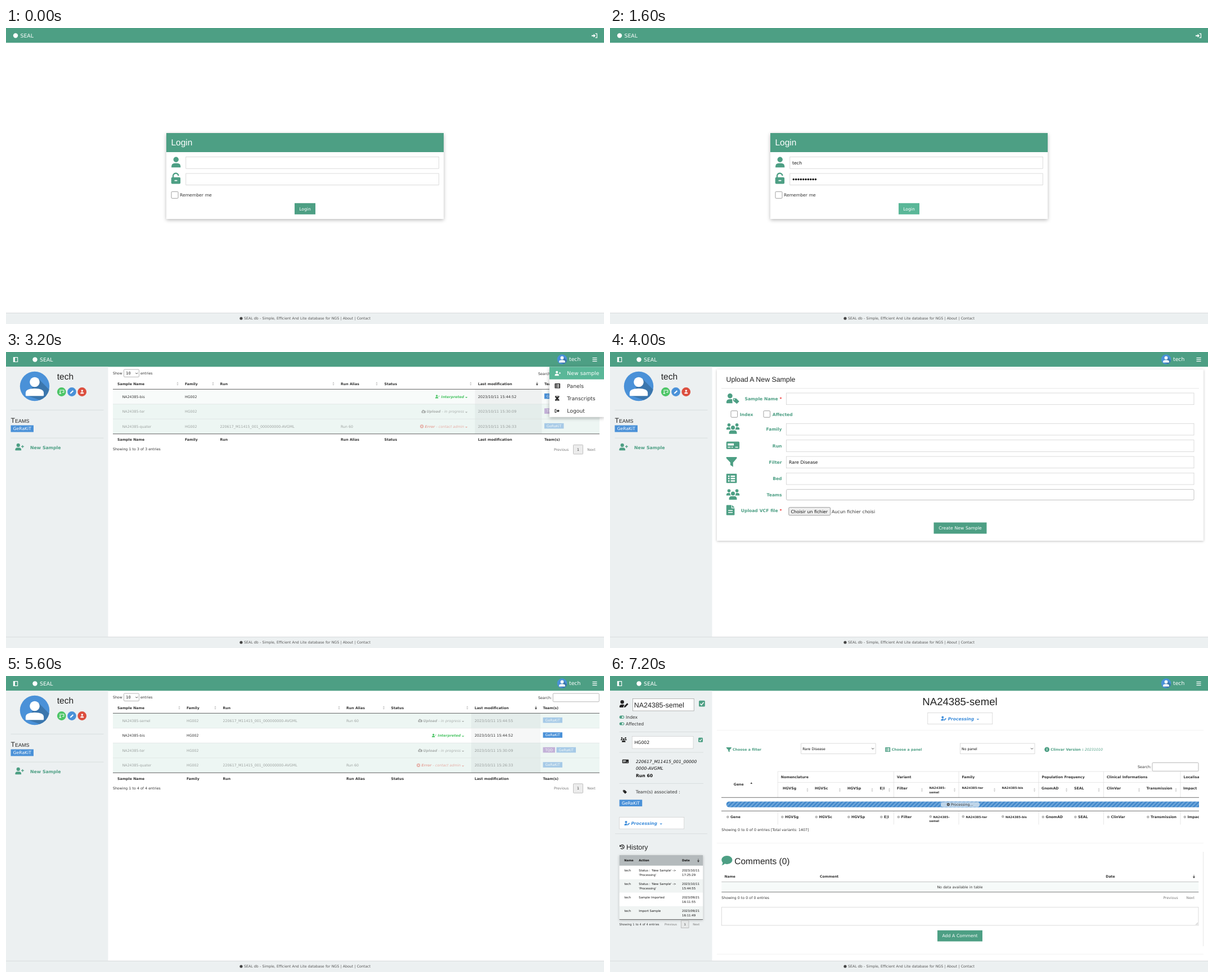
An HTML page that plays this animation: 1063x527 px, repeating every 8000 ms.

```html
<!DOCTYPE html>
<html lang="en">
<head>
<meta charset="utf-8">
<title>SEAL db</title>
<style>
html, body { margin: 0; width: 100%; height: 100%; overflow: hidden; background: #fff; }
svg { display: block; width: 100%; height: 100%; }
text { font-family: "DejaVu Sans", sans-serif; fill: #333; word-spacing: .034em; text-rendering: geometricPrecision; white-space: pre; }
.ar { font-family: "Liberation Sans", Arial, sans-serif; word-spacing: 0; fill: #222; }
.b { font-weight: bold; }
.i { font-style: italic; }
.m { text-anchor: middle; }
.e { text-anchor: end; }
.w { fill: #fff; }
.k { fill: #111; }
.g { fill: #4d9f84; }
.bl { fill: #3f8edb; }
.gy { fill: #777; }
.caps { font-variant: small-caps; }
.card { filter: drop-shadow(0 2px 3px rgba(0,0,0,.28)); }
.soft { filter: drop-shadow(0 1px 2px rgba(0,0,0,.25)); }
</style>
</head>
<body>
<svg id="stage" viewBox="0 0 1063 527" preserveAspectRatio="none"></svg>
<script>
const GREEN = '#4d9f84', HOVER = '#5ab798', BLUE = '#4a91d8', SIDE = '#ecf0f1', RED = '#dc4f3f', LIME = '#4cc566', PURPLE = '#8e57b5';
const NAME = 'tech', TEAM = 'GeRaKiT', TEAM2 = 'TQD', RUN = '220617_M11415_001_000000000-AVGML';

const T = (x, y, s, c = '', z = 6.2, more = '') => `<text x="${x}" y="${y}" class="${c}" font-size="${z}" ${more}>${s}</text>`;
const R = (x, y, w, h, fill = '#fff', more = '') => `<rect x="${x}" y="${y}" width="${w}" height="${h}" fill="${fill}" ${more}/>`;
const C = (x, y, r, fill, more = '') => `<circle cx="${x}" cy="${y}" r="${r}" fill="${fill}" ${more}/>`;
const P = (d, fill, more = '') => `<path d="${d}" fill="${fill}" ${more}/>`;
const L = (x, y, x2, y2, color = '#ddd', w = .7) => `<path d="M${x} ${y}L${x2} ${y2}" stroke="${color}" stroke-width="${w}"/>`;
const box = (x, y, w, h, color = '#ccc', r = 0) => R(x, y, w, h, '#fff', `stroke="${color}" stroke-width=".7" rx="${r}"`);
const button = (x, y, w, h, s, fill = GREEN) => R(x, y, w, h, fill) + T(x + w / 2, y + h / 2 + 2.8, s, 'w m', 7.7);
const chip = (x, y, w, h, s, z = 6.2, fill = BLUE) => R(x, y, w, h, fill) + T(x + w / 2, y + h / 2 + z * .36, s, 'w m', z);

// Icons live on a grid 16 units high.
const person = 'M7 0a4 4 0 1 1 0 8a4 4 0 1 1 0-8M0 15Q0 9.5 5.5 9.5h3Q14 9.5 14 15q0 1-1 1H1q-1 0-1-1z';
const icons = {
  person,
  plus: person + 'M16 4h1.7v2.3H20V8h-2.3v2.3H16V8h-2.3V6.300H16z',
  check: person + 'M13 6l1.2-1.200L16 6.600 19 3.500 20.200 4.800 16 9z',
  edit: 'M6 0a4 4 0 1 1 0 8a4 4 0 1 1 0-8M0 15Q0 9.500 5.500 9.500h2Q10 9.500 11 10.500L9 13 8.500 16H1q-1 0-1-1zM10 16l.6-3L17 6.500l2.300 2.300L13 15.400z',
  tagged: 'M6 0a4 4 0 1 1 0 8a4 4 0 1 1 0-8M0 15Q0 9.500 5.500 9.500h4L10 16H1q-1 0-1-1zM11 8h5l5 5-4 4-6-5zM13 9.300a.9.9 0 1 0 0 1.800a.9.9 0 1 0 0-1.800z',
  group: 'M10 3.500a3 3 0 1 1 0 6a3 3 0 1 1 0-6M4 0a2.400 2.400 0 1 1 0 4.800a2.400 2.400 0 1 1 0-4.800M16 0a2.400 2.400 0 1 1 0 4.800a2.400 2.400 0 1 1 0-4.800M4 15Q4 10.600 8 10.600h4Q16 10.600 16 15q0 1-1 1H5q-1 0-1-1zM0 9q0-3.200 3-3.200h2.300Q6 9 7 9.600H1Q0 9.600 0 9zM20 9q0-3.200-3-3.200h-2.300Q14 9 13 9.600h6q1 0 1-.6z',
  filter: 'M0 0H17V2L11 9V16L6.500 13V9L0 2z',
  list: 'M1 0H17q1 0 1 1V15q0 1-1 1H1q-1 0-1-1V1q0-1 1-1M3 3v2.500h2.500V3zM7.500 3v2.500H15V3zM3 7v2.500h2.500V7zM7.500 7v2.500H15V7zM3 11v2.500h2.500V11zM7.500 11v2.500H15V11z',
  file: 'M1 0H8V5H13V15q0 1-1 1H1q-1 0-1-1V1q0-1 1-1M9 0L13 4H9zM3 8v1.300h7V8zM3 11v1.300h7V11z',
  machine: 'M2 0H26q2 0 2 2V14q0 2-2 2H2q-2 0-2-2V2q0-2 2-2M3 4v4.500H16V4zM3 11v2H9v-2zM11 11v2h3v-2zM19 11v2h6v-2z',
  tag: 'M0 1H7L15 9 8.500 15.500 0 7zM3 3a1.300 1.300 0 1 0 0 2.600a1.300 1.300 0 1 0 0-2.600z',
  cloud: 'M5 15a5 5 0 0 1-1-9.500a5.500 5.500 0 0 1 10.500-1.500a5 5 0 0 1 2 11zM10 5L6 9.500h2.500V13h3V9.500H14z',
  error: 'M8 0a8 8 0 1 1 0 16a8 8 0 1 1 0-16M5 3.500L3.500 5l3 3-3 3L5 12.500l3-3 3 3 1.500-1.500-3-3 3-3L11 3.500l-3 3z',
  exit: 'M0 2H6V4H2V12H6V14H0zM5 6.500H10V3L16 8 10 13V9.500H5z',
  enter: 'M0 6.500H6V2.500L12 8 6 13.500V9.500H0zM11 1H17V15H11V13H15V3H11z',
  gene: 'M1 0H15V3Q14 6 10 8 14 10 15 13V16H1V13Q2 10 6 8 2 6 1 3zM4 2v1h8V2zM4 13v1h8v-1z',
  pane: 'M1 0H14q1 0 1 1V15q0 1-1 1H1q-1 0-1-1V1q0-1 1-1M5.500 2V14H13V2z',
  gear: 'M6.500 0h3l.5 2 2 1 2-.6 1.500 2.600-1.500 1.500v3l1.500 1.500-1.500 2.600-2-.6-2 1-.5 2h-3L6 14l-2-1-2 .6L.5 11 2 9.500v-3L.5 5 2 2.400 4 3l2-1zM8 5a3 3 0 1 0 0 6a3 3 0 1 0 0-6z',
  pen: 'M0 16L1.500 11 11 1.500 14.500 5 5 14.500z',
  board: 'M2 1H18V11H11V9H16V3H4V5H2zM4 6a2 2 0 1 1 0 4a2 2 0 1 1 0-4M0 15Q0 11 4 11T8 15z',
  history: 'M8 1a7 7 0 1 1-5.500 11.500L4 11a5 5 0 1 0-.3-5.600L6 7.500H0V1.500L2.200 3.800A7 7 0 0 1 8 1M7 4.500H9V8l2.500 1.800-1 1.500L7 9z',
  bubble: 'M9 0C14 0 18 3 18 7S14 14 9 14Q7 14 5.500 13.500 3 16 0 16 2 14 2 11.500 0 9.500 0 7C0 3 4 0 9 0z'
};
const icon = (name, x, y, h, fill = GREEN) => `<path d="${icons[name]}" fill="${fill}" fill-rule="evenodd" transform="translate(${x} ${y}) scale(${h / 16})"/>`;
const caret = (x, y, fill) => P(`M${x} ${y}h4.400l-2.200 2.200z`, fill);
const chevron = (x, y) => P(`M${x} ${y}l2 2 2-2`, 'none', 'stroke="#333" stroke-width=".9"');
const sorter = (x, y, on) => on ? P(`M${x - 2} ${y}h4l-2 3.500zM${x - .4} ${y - 3}h.8v3h-.8z`, '#444') : P(`M${x - 1.600} ${y - .6}l1.600-3 1.600 3zM${x - 1.600} ${y + .6}l1.600 3 1.600-3z`, '#ccc');
const tick = (x, y, s, fill) => R(x, y, s, s, fill, 'rx="1.5"') + P(`M${x + s * .22} ${y + s * .52}l${s * .2} ${s * .22} ${s * .37}-${s * .46}`, 'none', `stroke="#fff" stroke-width="${s * .13}"`);
const avatar = (x, y, r) => `<g transform="translate(${x} ${y}) scale(${r / 26})">` + C(0, 0, 26, BLUE) +
  P('M7-13L25.500 6A26 26 0 0 1 9 24.400L-15 16z', '#3b76ad') + C(0, -7.500, 8.700, '#fff') +
  P('M-16 16V12Q-16 4 0 4T16 12V16q0 1-1 1H-15q-1 0-1-1z', '#fff') + '</g>';

const bars = () => R(0, 0, 1063, 26.300, GREEN) + R(0, 507, 1063, 20, SIDE) + L(0, 507.400, 1063, 507.400, '#d3d7d8', .8) +
  C(418, 517, 2.600, '#444') + T(423, 519.300, 'SEAL db - Simple, Efficient And Lite database for NGS | About | Contact', '', 6.250, 'style="fill:#555"');
const brand = x => C(x, 13.500, 4.200, '#fff') + T(x + 8.500, 16.900, 'SEAL', 'w', 9.350);
const frame = () => bars() + brand(51.500) + icon('pane', 12.800, 9, 9, '#fff') + avatar(988.500, 13, 8.700) + T(1001, 16.200, NAME, 'w', 9.300) +
  [10.500, 13.500, 16.500].map(y => L(1042.500, y, 1050.500, y, '#fff', 1.200)).join('') + R(0, 26.300, 181.500, 480.700, SIDE);

const login = (filled, focus, hover) => bars() + brand(17) + icon('enter', 1041, 9, 9.500, '#fff') +
  R(285, 187, 493, 153, '#fff', 'class="card"') + R(285, 187, 493, 34, GREEN) + T(293.500, 209, 'Login', 'ar', 15.500, 'style="fill:#fff"') +
  icon('person', 294, 229.500, 18.800) + P('M297 267V264.500a4.800 5 0 0 1 9.600-1.500', 'none', `stroke="${GREEN}" stroke-width="2.300"`) +
  R(293.700, 265.800, 16.400, 11.800, GREEN, 'rx="2"') + R(299.500, 270.700, 5, 1.900, '#fff', 'rx=".9"') +
  box(319.800, 229.500, 449.500, 20.700) + box(319.800, 259, 449.500, 20.500, focus ? '#555' : '#ccc') +
  (filled ? T(324, 242.700, NAME, 'k', 7.800) + Array.from({ length: 10 }, (_, i) => C(326.300 + i * 4.350, 269.500, 1.700, '#111')).join('') : '') +
  box(294, 291.300, 12, 12, '#767676', 1.500) + T(309, 300.200, 'Remember me', '', 7.650) + button(513, 311.800, 37, 20, 'Login', hover ? HOVER : GREEN);

const sidebar = d => `<g transform="translate(0 ${d})">` + avatar(51, 61, 26.200) + T(90.800, 48.800, NAME, 'ar', 15.500) +
  C(98.800, 71, 7.900, LIME) + C(117, 71, 7.900, BLUE) + C(135.200, 71, 7.900, RED) +
  icon('board', 94.400, 67, 8, '#fff') + icon('pen', 113.800, 67.500, 7, '#fff') + icon('person', 132.200, 67.300, 7, '#fff') +
  L(8.500, 103.400, 173.500, 103.400, '#d2d6d7') + T(8.500, 125.500, 'Teams', 'ar caps', 12.300) + chip(8.500, 130.500, 40.500, 12, TEAM, 7.600) +
  L(8.500, 153.200, 173.500, 153.200, '#d2d6d7') + icon('plus', 16.300, 162.800, 12.500) + T(43, 173.200, 'New Sample', 'b g', 7.800) + '</g>';
const alert = () => R(8.300, 35, 165, 20.500, '#ddfadb') + R(8.300, 35, 3, 20.500, '#4caf50') +
  T(19.500, 47.800, `You are logged in as: ${NAME}!`, 'k', 7.700) + T(159, 47.800, '×', 'b k', 7.700);

const wide = { x: [198, 321, 385.500, 605, 684.500, 833, 954.500], s: [308, 372, 592, 671.500, 820, 942], from: 827, to: 950, end: 814.500 };
const tight = { x: [198, 318, 380.500, 595, 672.500, 839, 957], s: [305, 368, 582, 659, 826, 944], from: 833.500, to: 952.500, end: 820.500 };
const heads = ['Sample Name', 'Family', 'Run', 'Run Alias', 'Status', 'Last modification', 'Team(s)'];
const states = {
  fresh: ['plus', 59.500, '#3f8edb', 'New Sample', ''],
  done: ['check', 57.500, LIME, 'Interpreted', ''],
  work: ['edit', 54.500, '#3f8edb', 'Processing', ''],
  load: ['cloud', 82.500, '#555', 'Upload', ' - in progress'],
  fail: ['error', 84.500, RED, 'Error', ' - contact admin']
};
const sample = (id, state, time, run, teams = [TEAM]) => ({ id, state, time, run, teams, dim: state == 'load' || state == 'fail' });
const semel = s => sample('semel', s, '15:44:55', 1), bis = sample('bis', 'done', '15:44:52'),
  ter = s => sample('ter', s, '15:30:09', 0, [TEAM2, TEAM]), quater = sample('quater', 'fail', '15:26:33', 1);

function row(r, i, c) {
  const y = 66.300 + i * 26.500, b = y + 15.400, [ic, dx, color, main, rest] = states[r.state], end = c.end;
  let tx = c.x[6];
  const left = end - (r.state == 'work' ? 54.500 : dx);
  return R(190, y, 865, 26.500, r.dim ? '#edf6f3' : i % 2 ? '#fff' : '#f8fbfa') + R(c.from, y, c.to - c.from, 26.500, r.dim ? '#e4edeb' : i % 2 ? '#f6f7f7' : '#eff1f1') +
    (i ? L(190, y, 1055, y, '#d5dcda', .6) : '') + `<g opacity="${r.dim ? .43 : 1}">` +
    T(c.x[0] + 8.700, b, 'NA24385-' + r.id, '', 6.250) + T(c.x[1], b, 'HG002', '', 6.250) +
    (r.run ? T(c.x[2], b, RUN, '', 6.350) + T(c.x[3], b, 'Run 60') : '') +
    icon(ic, left, y + 10, 6.300, color) +
    T(end - 6.300, b, `<tspan class="b">${main}</tspan>${rest}`, 'i e', 6.250, `style="fill:${color}"`) + caret(end - 4.400, y + 13.600, color) +
    T(c.x[5], b, '2023/10/11 ' + r.time, '', 6.450) +
    r.teams.map(t => { const w = t == TEAM ? 34.500 : 21.500, x = tx; tx += w + 2.500; return chip(x, y + 7.500, w, 9.600, t, 6.250, t == TEAM ? BLUE : PURPLE); }).join('') + '</g>';
}
function table(rows, c = wide) {
  const n = rows.length, end = 66.300 + n * 26.500;
  return T(190, 40, 'Show') + box(209.500, 31, 27, 13.500, '#999', 1.500) + T(213.300, 40.300, '10', 'k', 6.700) + chevron(230.300, 37) + T(239, 40, 'entries') +
    T(946, 40.800, 'Search:', '', 6.400) + box(972.300, 31, 82, 14.800, '#999', 1.500) +
    heads.map((h, i) => T(c.x[i], 58.500, h, 'b') + T(c.x[i], end + 12.500, h, 'b')).join('') +
    c.s.map((x, i) => sorter(x, 56.500, i == 5)).join('') + rows.map((r, i) => row(r, i, c)).join('') +
    L(190, 66.300, 1055, 66.300, '#222', .7) + L(190, end, 1055, end, '#222', .7) +
    T(190, end + 29.500, `Showing 1 to ${n} of ${n} entries`) + T(974, end + 30, 'Previous', 'gy') +
    R(1008.500, end + 19.500, 17, 16.500, '#ececec', 'stroke="#aaa" stroke-width=".7" rx="1"') + T(1017, end + 30, '1', 'm') + T(1033.300, end + 30, 'Next', 'gy');
}
const menu = () => R(966, 26.300, 97, 89.500, '#fff', 'class="card"') + R(966, 26.300, 97, 22.400, HOVER) +
  ['plus New sample', 'list Panels', 'gene Transcripts', 'exit Logout'].map((s, i) => {
    const k = s.indexOf(' '), y = 41.200 + i * 22.300;
    return icon(s.slice(0, k), 975.500, y - 7.500, 8.500, i ? '#222' : '#fff') + T(997.300, y, s.slice(k + 1), i ? '' : 'w', 9.250);
  }).join('');

function form(full) {
  const label = (y, s, must) => T(305.500, y, s + (must ? ' <tspan fill="#e33">*</tspan>' : ''), 'b g e', 7.600);
  const field = (y, label_, name, h, ix, value, must) => icon(name, 206.800, y + ix, h) + label(y + 12.900, label_, must) + box(313.500, y, 724.500, 20.700) + T(318, y + 13.400, value, 'k', 7.800);
  const check = (x, s) => (full ? tick(x, 104.500, 12, '#2f73e6') : box(x, 104.700, 11.600, 11.600, '#767676', 1.500)) + T(x + 15.800, 113.700, s, 'b g', 7.600);
  const v = s => full ? s : '';
  return R(190, 31, 865, 305, '#fff', 'class="soft"') + T(206.500, 53.300, 'Upload A New Sample', 'ar', 12.350) + L(198, 64.800, 1047, 64.800) +
    field(73, 'Sample Name', 'tagged', 17.500, .7, v('NA24385-semel'), 1) + check(215, 'Index') + check(273, 'Affected') +
    field(127.300, 'Family', 'group', 18.800, -.3, v('HG002')) + field(156.700, 'Run', 'machine', 13.300, 2.800, v(RUN)) +
    field(186, 'Filter', 'filter', 17.500, 1, 'Rare Disease') + field(215.300, 'Bed', 'list', 16.500, 1.500, '') +
    icon('group', 206.800, 244.300, 18.800) + label(257.300, 'Teams') + box(313.500, 244.700, 724.500, 18.800, '#aaa', 2) +
    (full ? R(317, 248, 47, 12.300, '#e4e4e4', 'stroke="#aaa" stroke-width=".7" rx="2"') + T(319.300, 257, '×', '', 7) + T(328.300, 257, TEAM, '', 7.700) : '') +
    icon('file', 206.800, 272.600, 18) + label(284.700, 'Upload VCF file', 1) +
    R(317.800, 276.700, 73.800, 14, '#efefef', 'stroke="#767676" stroke-width=".7" rx="1.500"') + T(321.500, 286.500, 'Choisir un fichier', 'k', 7.700) +
    T(394, 286.500, full ? 'SEAL - NA24385-semel.vcf' : 'Aucun fichier choisi', '', 7.850) + button(575.500, 303.500, 94, 20, 'Create New Sample');
}

function sideDetail() {
  const line = y => L(16.500, y, 166, y, '#d2d6d7');
  const toggle = y => R(16.700, y - 2.600, 8.600, 5.200, GREEN, 'rx="2.600"') + C(22.600, y, 1.500, '#fff');
  const logs = [["Status : 'New Sample' -&gt;", "'Processing'", '2023/10/11', '17:25:29'], ["Status : 'New Sample' -&gt;", "'Processing'", '2023/10/11', '15:44:55'],
    ['Sample Imported', '', '2023/09/21', '16:11:55'], ['Import Sample', '', '2023/09/21', '16:11:49']];
  return icon('edit', 16.800, 43, 13, '#222') + box(40.500, 40.300, 108.700, 21.700, '#999') + T(42.800, 55.600, 'NA24385-semel', 'ar', 12.400) + tick(158, 43.700, 10.800, GREEN) +
    toggle(73.200) + T(28, 76, 'Index', '', 7.700) + toggle(85) + T(28, 87.800, 'Affected', '', 7.700) + line(99.500) +
    icon('group', 18.800, 109, 8.800, '#222') + box(39.300, 107.500, 108.700, 21.500) + T(43.500, 121, 'HG002', 'k', 7.800) + tick(157, 109.700, 8, GREEN) + line(136) +
    icon('machine', 21.800, 148.800, 6.500, '#222') + T(46, 155, RUN.slice(0, 23), 'i k', 7.500) + T(46, 167.300, RUN.slice(23), 'i k', 7.600) + T(46, 179.700, 'Run 60', 'b k', 7.600) + line(191.400) +
    icon('tag', 23, 202.500, 7.500, '#222') + T(45.800, 208.900, 'Team(s) associated :', '', 7.650) + chip(16.700, 220.300, 40.500, 11.800, TEAM, 7.600) +
    box(16.700, 251.600, 115, 20.500) + icon('edit', 25.500, 258, 8, '#3f8edb') + T(37.500, 264.700, 'Processing', 'b i bl', 7.600) + caret(88.500, 262.500, '#3f8edb') +
    L(9, 280.800, 173, 280.800, '#d2d6d7') + icon('history', 17, 299.500, 9.500, '#222') + T(29, 308.500, 'History', 'ar', 12.400) +
    R(16.700, 319, 148.500, 114.500, '#fff', 'class="soft"') + R(16.700, 319, 148.500, 18.800, '#b4babc') +
    T(25.300, 330.300, 'Name', 'b k', 5.100) + T(51.200, 330.300, 'Action', 'b k', 5.200) + T(128, 330.300, 'Date', 'b k', 5.200) + sorter(157, 328.500, 1) +
    logs.map((g, i) => {
      const y = 348 + i * 24;
      return R(16.700, y - 10.200, 148.500, 24, i % 2 ? '#f0f4f3' : '#fff') + T(25.500, y, NAME, 'k', 5.250) + T(51.300, y, g[0], 'k', 5.250) + T(51.300, y + 7.500, g[1], 'k', 5.250) +
        T(128, y, g[2], 'k', 5.400) + T(128, y + 7.500, g[3], 'k', 5.400);
    }).join('') + L(16.700, 433.500, 165.200, 433.500, '#333') +
    T(16.500, 444, 'Showing 1 to 4 of 4 entries', '', 5.200) + T(97, 444, 'Previous', 'gy', 5.200) +
    R(126.300, 435.700, 13.700, 12.700, '#e6e8e8', 'stroke="#aaa" stroke-width=".7"') + T(133.200, 444, '1', 'm', 5.200) + T(147.300, 444, 'Next', 'gy', 5.200);
}

// label, head x, foot x, sorter x
const cols = [['HGVSg', 307, 311, 351], ['HGVSc', 364, 371.500, 408.500], ['HGVSp', 422, 429, 466], ['E|I', 479.500, 487, 496.500], ['Filter', 510, 517.500, 554.500],
  ['NA24385-', 567.500, 574.500, 612.500], ['NA24385-ter', 625.500, 632.500, 683.500], ['NA24385-bis', 696.500, 703, 754.500], ['GnomAD', 767, 774.500, 811.500],
  ['SEAL', 825, 832, 869], ['ClinVar', 883, 890.500, 940.500], ['Transmission', 953.500, 961, 1006], ['Impact', 1019, 1026.500, 1055]];
const groups = { Nomenclature: 298.300, Variant: 504.500, Family: 620, 'Population Frequency': 762, 'Clinical Informations': 877.500, Localisation: 1014 };

function variants() {
  const mark = (x, y) => C(x - 4.700, y - 2.300, 2.200, '#aaa') + C(x - 4.700, y - 2.300, .9, '#ddd');
  return '<g clip-path="url(#view)">' + L(298, 170, 1047, 170) + L(298, 189.500, 1047, 189.500) +
    Object.entries(groups).map(([s, x]) => T(x + 5.500, 182, s, 'b', 6.200) + L(x, 170, x, 216) + L(x, 241, x, 264.500)).join('') +
    T(219.800, 195, 'Gene', 'b') + P('M249.500 192l1.800-3 1.800 3z', '#444') + mark(214, 253.300) + T(214, 253.300, 'Gene', 'b') +
    cols.map(([s, h, f, x]) => {
      const tiny = s.startsWith('NA'), z = tiny ? 5.300 : 6.250, up = tiny ? .8 : 0, two = s.endsWith('-');
      return T(h, 202.200 - up, s, 'b', z) + mark(f, 253.300 - up) + T(f, 253.300 - up, s, 'b', z) + sorter(x, 202.800) +
        (two ? T(h, 209, 'semel', 'b', z) + T(h, 260, 'semel', 'b', z) : '');
    }).join('') + L(198, 216.300, 1047, 216.300, '#333') + R(206.800, 223.400, 860, 10.300, 'url(#stripe)', 'rx="5"') + L(198, 240.300, 1047, 240.300, '#333') + '</g>' +
    R(588, 224.400, 69, 8.800, '#c9dcec', 'rx="4" opacity=".9"') + icon('gear', 598.500, 226, 5.600, '#333') + T(606, 231.200, 'Processing...', '', 6.250);
}
function detail() {
  const select = (x, s) => box(x, 120, 132.500, 18.600) + T(x + 2.500, 131.800, s, 'k', 6.200) + chevron(x + 125.500, 128.300);
  return sideDetail() + T(622, 52, 'NA24385-semel', 'ar m', 18.600) + box(564.800, 65.500, 115, 20.200) + icon('edit', 588.300, 71.500, 8, '#3f8edb') +
    T(600.700, 78.500, 'Processing', 'b i bl', 7.600) + caret(651.700, 76.300, '#3f8edb') + L(190, 96.500, 1055, 96.500, '#eee') +
    icon('filter', 206.800, 127, 8.500) + T(218, 133.300, 'Choose a filter', 'b g') + select(339.700, 'Rare Disease') +
    icon('list', 489.200, 127, 8) + T(500.800, 133.300, 'Choose a panel', 'b g') + select(622.500, 'No panel') +
    C(776.700, 130.800, 4.400, GREEN) + T(776.700, 133.100, 'i', 'w b m') + T(783.300, 133.300, 'Clinvar Version : <tspan class="i" font-weight="normal">20231010</tspan>', 'b g', 6.250) +
    T(938, 164, 'Search:', '', 6.400) + box(964, 154.300, 82, 15, '#999', 1.500) + variants() +
    T(198.300, 276.300, 'Showing 0 to 0 of 0 entries [Total variants: 1407]', '', 6.250) + L(190, 297.500, 1055, 297.500, '#eee') + L(1054.600, 313, 1054.600, 481, '#ddd') +
    icon('bubble', 198.300, 320, 17) + T(221.300, 335, 'Comments (0)', 'ar', 15.500) +
    T(203.500, 358.800, 'Name', 'b', 6) + T(373, 358.800, 'Comment', 'b') + T(881.300, 358.800, 'Date', 'b') + sorter(1038, 357, 1) +
    R(198.300, 366.500, 848, 18.200, '#f6faf9') + L(198.300, 366.500, 1046.300, 366.500, '#aaa') + L(198.300, 384.700, 1046.300, 384.700, '#444') +
    T(622, 378, 'No data available in table', 'm', 6.250) + T(198.300, 396.800, 'Showing 0 to 0 of 0 entries') + T(983.500, 397, 'Previous', 'gy') + T(1024.500, 397, 'Next', 'gy') +
    box(198.300, 411.800, 847.700, 32.200) + P('M1041 443l4-4M1043 443l2-2', 'none', 'stroke="#888" stroke-width=".5"') + button(582, 452.800, 80, 19.700, 'Add A Comment') + L(190, 495.300, 1055, 495.300, '#eee');
}

const early = [bis, ter('load'), quater];
const scenes = [
  login(false), login(true, true), login(true, false, true),
  frame() + alert() + sidebar(36.500) + table(early),
  frame() + sidebar(0) + table(early, tight) + menu(),
  frame() + sidebar(0) + form(false),
  frame() + sidebar(0) + form(true),
  frame() + sidebar(0) + table([semel('load'), bis, ter('load'), quater]),
  frame() + sidebar(0) + table([semel('fresh'), bis, ter('work'), quater]),
  frame() + detail()
];
const stage = document.getElementById('stage');
stage.innerHTML = `<defs><clipPath id="view"><rect x="190" y="165" width="857" height="105"/></clipPath>
<pattern id="stripe" width="7.200" height="10.300" x="206.800" y="223.400" patternUnits="userSpaceOnUse" patternTransform="skewX(-45)">${R(0, 0, 7.200, 10.300, '#4288cb')}${R(0, 0, 3.600, 10.300, '#6ea6da')}</pattern></defs>` +
  R(0, 0, 1063, 527) + scenes.map(s => `<g display="none">${s}</g>`).join('');
const layers = stage.querySelectorAll(':scope > g');

const STEP = 800, start = performance.now();
let shown = -1;
function draw(now) {
  const k = Math.floor(Math.max(0, now - start) / STEP) % layers.length;
  if (k !== shown) {
    layers.forEach((g, i) => g.setAttribute('display', i === k ? 'inline' : 'none'));
    shown = k;
  }
  requestAnimationFrame(draw);
}
draw(start);
</script>
</body>
</html>
```
